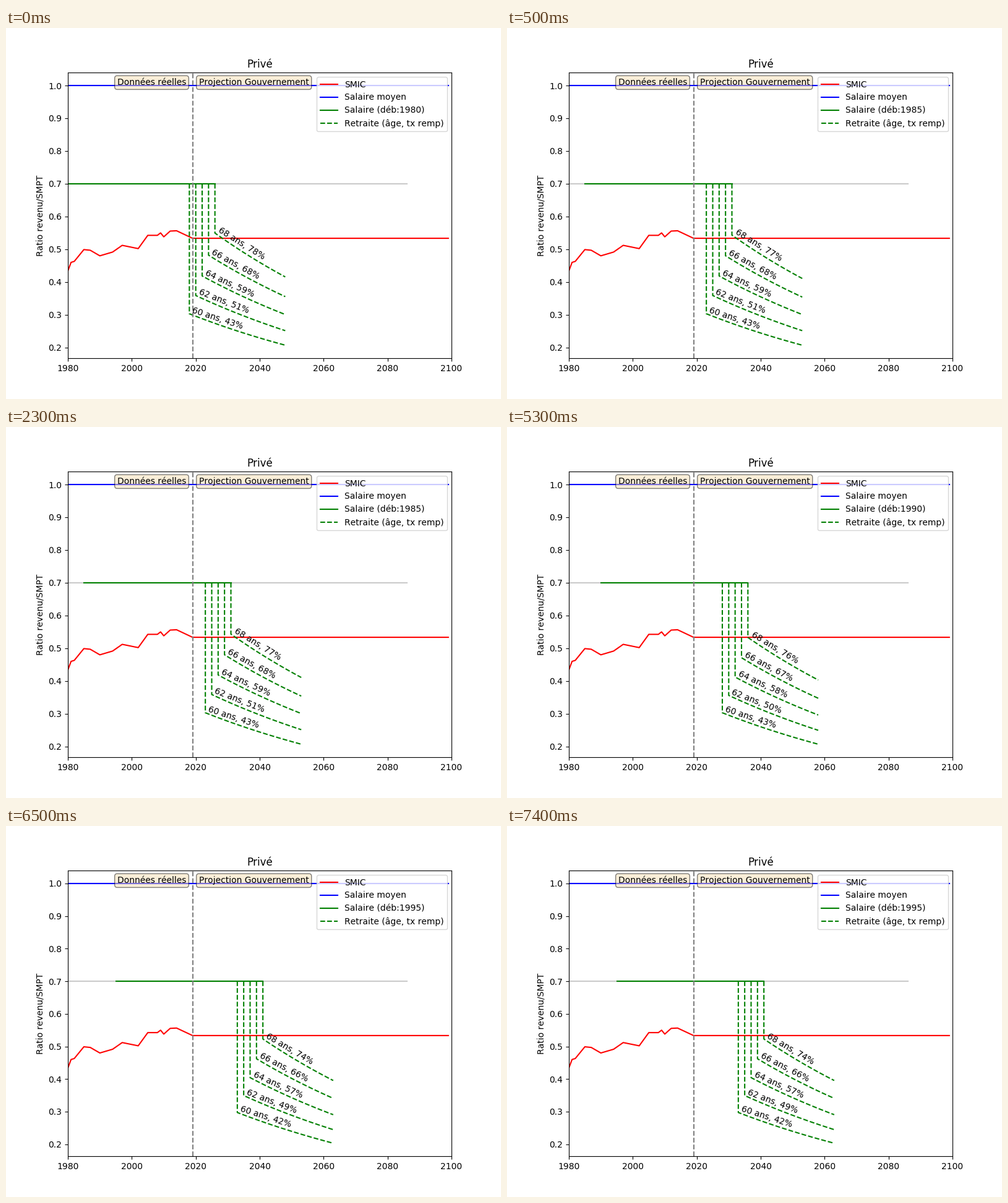
Recreate the animation shown at these times as a matplotlib script. Size 800 by 600 pixels, loop 8000 ms.

```python
import numpy as np
import matplotlib.pyplot as plt
from matplotlib.animation import FuncAnimation

plt.rcParams["font.family"] = "DejaVu Sans"
plt.rcParams["text.kerning_factor"] = 6   # text spacing without kerning

WAGE = 0.7
DECAY = 0.0127         # yearly loss of a pension against the mean wage
START_AGE, LAST_AGE = 22, 90
AGES = range(60, 70, 2)

# turning points of the minimum wage; flat after the last one
SMIC = [(1980, 0.434), (1981, 0.460), (1982, 0.463), (1985, 0.499),
        (1987, 0.497), (1990, 0.480), (1994, 0.4915), (1997, 0.512),
        (2002, 0.502), (2005, 0.5425), (2008, 0.5425), (2009, 0.550),
        (2010, 0.538), (2012, 0.5555), (2014, 0.5565), (2019, 0.5335)]

fig, ax = plt.subplots(figsize=(8, 6), dpi=100)


def replacement_rate(age, year):
    """Percent of the wage: grows with age, erodes for departures after 2028."""
    step = (age - AGES[0]) / 2
    full = 43.3 + 7.68 * step + 0.28 * step ** 2
    return full * np.exp(-0.0038 * max(0, year - 2028))


def pension(start, age):
    """Rate, then years and income ratio from retirement to the last age."""
    birth = start - START_AGE
    years = np.arange(birth + age, birth + LAST_AGE + 1)
    rate = replacement_rate(age, years[0])
    return rate, years, WAGE * rate / 100 * np.exp(-DECAY * (years - years[0]))


def label_pension(years, ratio, text):
    ends = ax.transData.transform([(years[0], ratio[0]), (years[-1], ratio[-1])])
    dx, dy = ends[1] - ends[0]
    angle = np.arctan2(dy, dx)
    ax.annotate(text, (years[0], ratio[0]),
                xytext=(2.5 - 3.3 * np.sin(angle), 2.2),
                textcoords="offset pixels", rotation=np.degrees(angle),
                rotation_mode="anchor", ha="left", va="baseline")


def label_period(year, text, side):
    ax.text(year, 0.98, text, transform=ax.get_xaxis_transform(),
            ha=side, va="top",
            bbox=dict(boxstyle="round", facecolor="wheat", alpha=0.5))


def draw(i):
    start = 1980 + 5 * ((i + 5) // 6)
    curves = [pension(start, age) for age in AGES]
    low = min(ratio[-1] for _, _, ratio in curves)
    margin = 0.05 * (1 - low)

    ax.clear()
    ax.set_xlim(1980, 2100)
    ax.set_ylim(low - margin, 1 + margin)
    ax.set_title("Privé")
    ax.set_ylabel("Ratio revenu/SMPT")

    ax.plot([1980, 2086], [WAGE, WAGE], color="#cbcbcb")
    years = np.arange(1980, 2100)
    ax.plot(years, np.interp(years, *zip(*SMIC)), color="red", label="SMIC")
    ax.plot([1980, 2099], [1, 1], color="blue", label="Salaire moyen")

    last_work = start - START_AGE + AGES[-1]
    ax.plot([start, last_work], [WAGE, WAGE], color="green",
            label=f"Salaire (déb:{start})")
    for age, (rate, years, ratio) in zip(AGES, curves):
        ax.plot(np.r_[years[0], years], np.r_[WAGE, ratio], "--", color="green",
                label="Retraite (âge, tx remp)" if age == AGES[0] else None)
        label_pension(years, ratio, f"{age} ans, {int(rate)}%")

    ax.axvline(2019, color="grey", linestyle="--")
    label_period(2017, "Données réelles", "right")
    label_period(2021, "Projection Gouvernement", "left")
    ax.legend(loc="upper right")
    return []


anim = FuncAnimation(fig, draw, frames=16, interval=500, repeat=True,
                     repeat_delay=0, init_func=lambda: draw(0))
plt.show()
```
